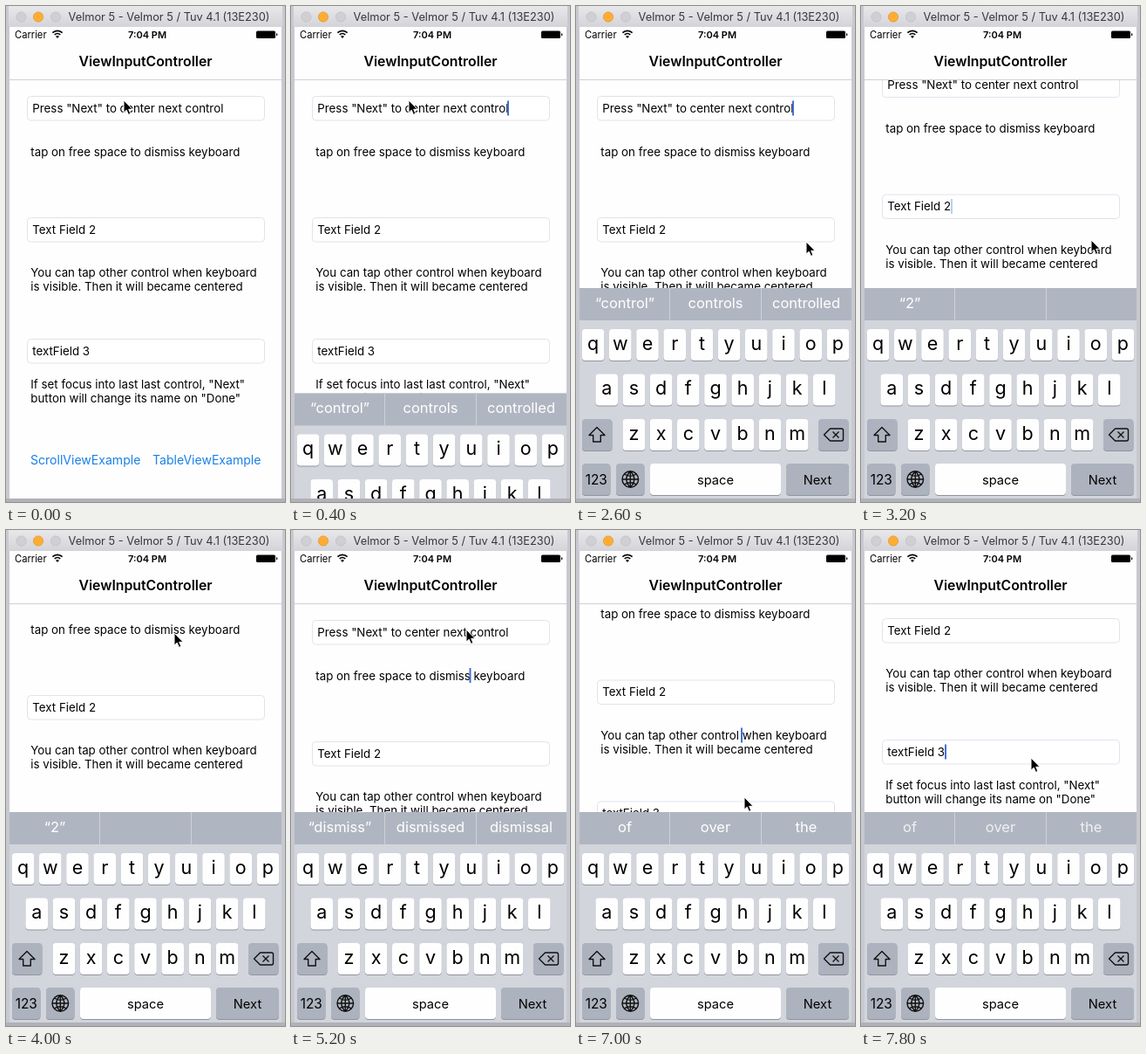
These frames come from a looping animation (320x568 px, 8000 ms). An HTML page:

```html
<!DOCTYPE html>
<html lang="en">
<head>
<meta charset="utf-8">
<title>Keyboard focus demo</title>
<style>
  html, body { margin: 0; width: 100%; height: 100%; overflow: hidden; background: #c8c9d0; }
  svg { display: block; width: 100%; height: 100%; font-family: Inter, Roboto, "Noto Sans", sans-serif; }
  text { white-space: pre; }
</style>
</head>
<body>
<svg id="stage" viewBox="0 0 320 568">
  <defs>
    <linearGradient id="bar" x2="0" y2="1">
      <stop offset="0" stop-color="#e8e7ea"/><stop offset="1" stop-color="#d4d3d8"/>
    </linearGradient>
    <clipPath id="screen"><rect x="4" y="24" width="312" height="540"/></clipPath>
  </defs>
  <rect width="320" height="568" fill="#c8c9d0"/>
  <rect y="564" width="320" height="4" fill="#b0b1b9"/>
  <rect x="3" width="314" height="24" fill="url(#bar)"/>
  <g stroke-width=".7">
    <circle cx="17.5" cy="12.5" r="5.6" fill="#d0cfd4" stroke="#bdbcc3"/>
    <circle cx="37" cy="12.5" r="5.6" fill="#ffad32" stroke="#dc9232"/>
    <circle cx="57" cy="12.5" r="5.6" fill="#d0cfd4" stroke="#bdbcc3"/>
  </g>
  <text x="71.5" y="17" font-size="12.8" fill="#38383c">Velmor 5 - Velmor 5 / Tuv 4.1 (13E230)</text>
  <g clip-path="url(#screen)">
    <rect x="4" y="24" width="312" height="540" fill="#fefeff"/>
    <g id="content" font-size="13.32"></g>
    <rect x="4" y="24" width="312" height="60" fill="#fefeff"/>
    <path d="M4 84.5H316" stroke="#cfcfd8"/>
    <text x="10" y="36.5" font-size="11.2">Carrier</text>
    <g fill="none" stroke="#000" stroke-width="1.7">
      <path d="M53.4 30.6a8 8 0 0 1 11.2 0M55.7 33a4.7 4.7 0 0 1 6.6 0"/>
    </g>
    <path d="M59 37l-2-2.2a3 3 0 0 1 4 0z"/>
    <text x="162" y="36.5" font-size="11" font-weight="600" text-anchor="middle">7:04 PM</text>
    <rect x="287" y="28.5" width="22" height="8.5" rx="1.6"/>
    <path d="M310 31v3.6q1.4-.5 1.4-1.8t-1.4-1.8z"/>
    <text x="160" y="69" font-size="15.8" font-weight="600" text-anchor="middle">ViewInputController</text>
    <g id="keyboard"></g>
  </g>
  <path id="pointer" d="M0 0V14.2L3.2 11.2L5.5 16.4L7.9 15.3L5.7 10.3H10.1Z" fill="#000" stroke="#fff" stroke-width="1"/>
</svg>
<script>
const LOOP = 8000, STEP = 200;
const $ = id => document.getElementById(id);

function add(parent, tag, attrs, text) {
  const el = document.createElementNS('http://www.w3.org/2000/svg', tag);
  for (const name in attrs) el.setAttribute(name, attrs[name]);
  if (text) el.textContent = text;
  return parent.appendChild(el);
}

// Scrolling form
const content = $('content'), keyboard = $('keyboard');
const label = (x, y, text, attrs) => add(content, 'text', { x, y, ...attrs }, text);
function field(y, text) {
  add(content, 'rect', { x: 24.5, y: y + .5, width: 272, height: 27.5, rx: 4, fill: '#fff', stroke: '#e2e2ec' });
  label(30.3, y + 18.5, text);
}
field(103, 'Press "Next" to center next control');
label(28.3, 171.5, 'tap on free space to dismiss keyboard');
field(242, 'Text Field 2');
label(28.3, 310, 'You can tap other control when keyboard');
label(28.3, 326, 'is visible. Then it will became centered');
field(381, 'textField 3');
label(28.3, 438, 'If set focus into last last control, "Next"');
label(28.3, 454, 'button will change its name on "Done"');
const link = { fill: '#1a80e6', 'font-size': 14.05 };
label(28, 525, 'ScrollViewExample', link);
label(168, 525, 'TableViewExample', link);
const caret = add(content, 'rect', { width: 2, height: 17, fill: '#4670d8' });

// Keyboard
add(keyboard, 'rect', { x: 4, y: 323, width: 312, height: 241, fill: '#d2d5db' });
add(keyboard, 'rect', { x: 4, y: 323, width: 312, height: 37, fill: '#b0b6c1' });
add(keyboard, 'path', { d: 'M107.5 323V360M212.5 323V360', stroke: '#cdd1d8' });
const hints = [56, 160, 264].map(x => add(keyboard, 'text',
  { x, y: 345.5, 'font-size': 16.5, fill: '#fff', 'text-anchor': 'middle' }));

function key(x, y, width, text, size, dark) {
  const box = { x, width, height: 36, rx: 4 };
  add(keyboard, 'rect', { ...box, y: y + 1, fill: '#90949c' });
  add(keyboard, 'rect', { ...box, y, fill: dark ? '#adb3be' : '#fefeff' });
  if (text) add(keyboard, 'text', { x: x + width / 2, y: y + 23.5, 'font-size': size, 'text-anchor': 'middle' }, text);
}
['qwertyuiop', 'asdfghjkl', 'zxcvbnm'].forEach((letters, row) =>
  [...letters].forEach((c, i) =>
    key([6.8, 22.4, 53.6][row] + i * 31.2, 370 + row * 51.5, 25.6, c, 21.5)));
key(7, 473, 34.5, '', 0, true);
key(278, 473, 34.5, '', 0, true);
key(7, 524, 32.5, '123', 15.4, true);
key(46, 524, 32.5, '', 0, true);
key(85, 524, 150, 'space', 14.7);
key(241, 524, 72, 'Next', 14.7, true);
add(keyboard, 'path', {
  d: 'M24 482.5L33 491.5H28.3V499H19.7V491.5H15Z' +
     'M284.5 491L291.5 484H304.5Q306.5 484 306.5 486V496Q306.5 498 304.5 498H291.5Z' +
     'M294.5 487.5L301.5 494.5M301.5 487.5L294.5 494.5' +
     'M53 542a9.3 9.3 0 1 0 18.6 0a9.3 9.3 0 1 0-18.6 0ZH71.6M62.3 532.7V551.3' +
     'M62.3 532.7Q53.3 542 62.3 551.3Q71.3 542 62.3 532.7M55.3 536Q62.3 540.5 69.3 536M55.3 548Q62.3 543.5 69.3 548',
  fill: 'none', stroke: '#111', 'stroke-width': 1.4, 'stroke-linejoin': 'round'
});

// Motion tables: [time, ...values]
const SCROLL = [[3000, 0], [3400, 53], [4200, 53], [4600, 0], [6800, 0], [7200, 141]];
const KEYBOARD = [[200, 241], [600, 0]];
const POINTER = [
  [0, 135, 108], [400, 135, 108], [1200, 218, 266], [1800, 218, 266], [2600, 264, 270],
  [3200, 264, 268], [4000, 193, 118], [4400, 193, 118], [5200, 201, 114],
  [5600, 201, 114], [6600, 193, 306], [7000, 193, 306], [7600, 195, 261]
];
const FOCUS = [
  { at: 400, blink: 400, x: 248, y: 108.5, words: ['“control”', 'controls', 'controlled'] },
  { at: 3000, blink: 2400, x: 103, y: 247.5, words: ['“2”', '', ''] },
  { at: 4200, blink: 4200, x: 204.5, y: 158, words: ['“dismiss”', 'dismissed', 'dismissal'] },
  { at: 5400, blink: 5000, x: 248, y: 108.5, words: ['“control”', 'controls', 'controlled'] },
  { at: 6800, blink: 6800, x: 189, y: 297, words: ['of', 'over', 'the'] },
  { at: 7800, blink: 7800, x: 96, y: 386.5, words: ['of', 'over', 'the'], fade: .8 }
];
const BLINK = [1, 1, 1, 0, .35];

function sample(table, t) {
  const next = table.findIndex(row => row[0] > t);
  if (next === 0) return table[0].slice(1);
  if (next < 0) return table[table.length - 1].slice(1);
  const a = table[next - 1], b = table[next];
  const p = (t - a[0]) / (b[0] - a[0]), e = p * p * (3 - 2 * p);
  return a.slice(1).map((v, i) => v + (b[i + 1] - v) * e);
}

const move = (el, x, y) => el.setAttribute('transform', `translate(${x} ${y})`);

function draw(t) {
  move(content, 0, -sample(SCROLL, t)[0]);
  move(keyboard, 0, sample(KEYBOARD, t)[0]);
  move($('pointer'), ...sample(POINTER, t));
  const focus = FOCUS.filter(f => f.at <= t).pop();
  const shown = focus || FOCUS[0];
  caret.setAttribute('x', shown.x);
  caret.setAttribute('y', shown.y);
  caret.setAttribute('opacity', focus ? BLINK[(t - focus.blink) / STEP % BLINK.length] : 0);
  hints.forEach((hint, i) => {
    hint.textContent = shown.words[i];
    hint.setAttribute('opacity', shown.fade || 1);
  });
}

const start = performance.now();
function tick() {
  const t = (performance.now() - start) % LOOP;
  draw(Math.floor(t / STEP) * STEP);
  requestAnimationFrame(tick);
}
tick();
</script>
</body>
</html>
```
